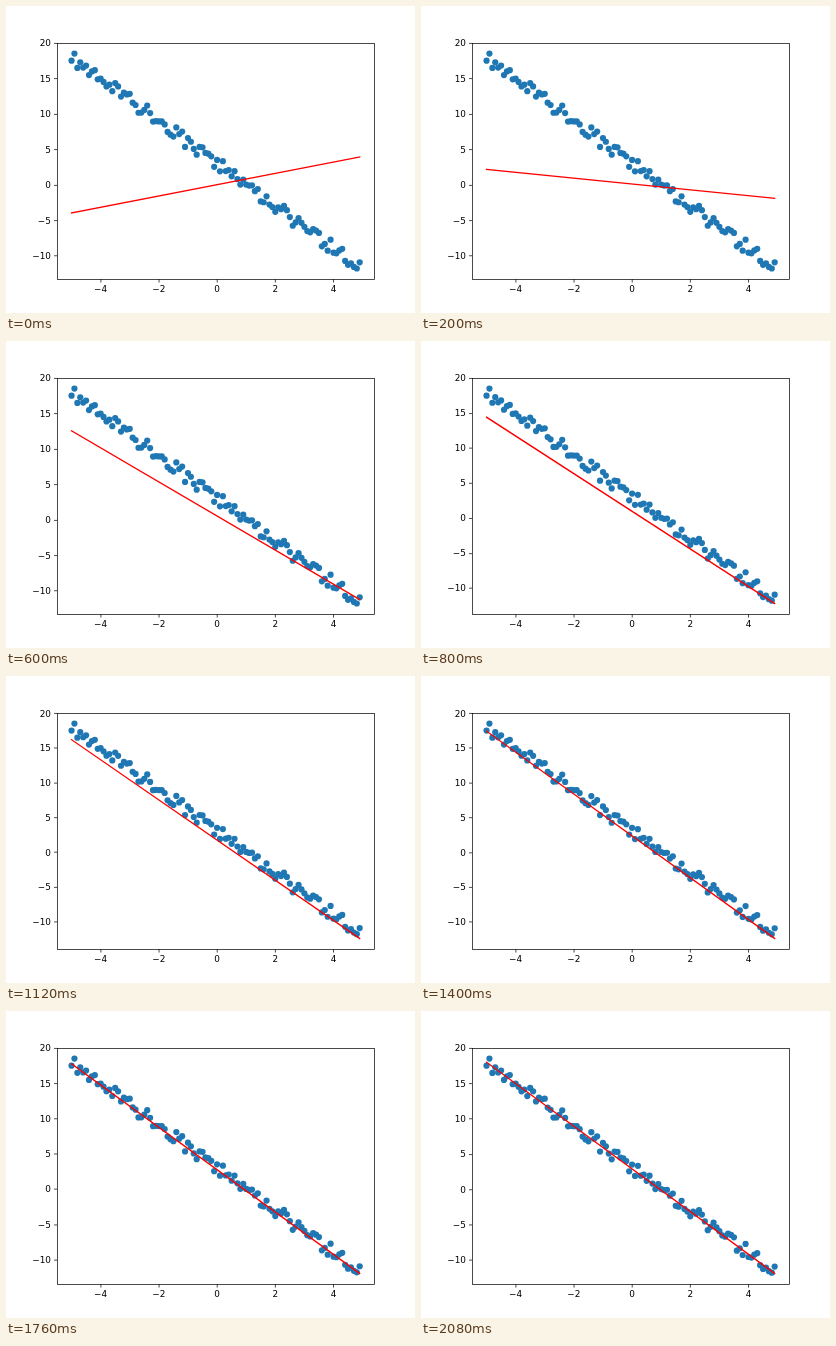
These frames come from a looping animation (409 by 307 pixels, 2.12 s). An HTML page with a canvas:

```html
<!DOCTYPE html>
<html lang="en">
<head>
<meta charset="utf-8">
<title>Line fit</title>
<style>
html, body { margin: 0; width: 100%; height: 100%; overflow: hidden; background: #fff; }
canvas { display: block; }
</style>
</head>
<body>
<canvas id="plot" width="409" height="307"></canvas>
<script>
const ctx = document.getElementById('plot').getContext('2d');
const STEP = 40, COUNT = 53, RATE = 0.1;
// Plot area inside a 640 x 480 figure
const L = 80, R = 576, T = 57.6, B = 427.2;

// Samples of y = 3 - 3x with even noise between -1 and 1
function sample(n) {
  const pts = [];
  let seed = 25;
  for (let i = 0; i < n; i++) {
    const x = -5 + i / 10;
    pts.push({ x, y: 3 - 3 * x + 2 * seed / 101 - 1 });
    seed = seed * 40 % 101;
  }
  return pts;
}
const pts = sample(100);
const ys = pts.map(p => p.y);
const X0 = pts[0].x, X1 = pts[pts.length - 1].x;

// Gradient descent on the mean absolute error
function descend() {
  const fits = [];
  let w = 0.795, b = 0.016;
  for (let k = 0; k < COUNT; k++) {
    fits.push({ w, b });
    let gw = 0, gb = 0;
    for (const { x, y } of pts) {
      const s = Math.sign(y - w * x - b);
      gw += s * x;
      gb += s;
    }
    w += RATE * gw / pts.length;
    b += RATE * gb / pts.length;
  }
  return fits;
}
const fits = descend();

function scale(lo, hi, from, to) {
  const pad = (hi - lo) * 0.05;
  return v => from + (v - lo + pad) / (hi - lo + 2 * pad) * (to - from);
}
const snap = v => Math.round(v) + 0.5;

function segment(x0, y0, x1, y1) {
  ctx.beginPath();
  ctx.moveTo(x0, y0);
  ctx.lineTo(x1, y1);
  ctx.stroke();
}
const label = v => String(v).replace('-', '\u2212');

function draw({ w, b }) {
  const start = w * X0 + b, end = w * X1 + b;
  const px = scale(X0, X1, L, R);
  const py = scale(Math.min(...ys, start, end), Math.max(...ys, start, end), B, T);

  ctx.setTransform(1, 0, 0, 1, 0, 0);
  ctx.fillStyle = '#fff';
  ctx.fillRect(0, 0, 409, 307);
  ctx.scale(409 / 640, 307 / 480);

  ctx.fillStyle = '#1f77b4';
  for (const { x, y } of pts) {
    ctx.beginPath();
    ctx.arc(px(x), py(y), 4.86, 0, 2 * Math.PI);
    ctx.fill();
  }

  ctx.strokeStyle = '#f00';
  ctx.lineWidth = 2.08;
  ctx.lineCap = 'square';
  segment(px(X0), py(start), px(X1), py(end));

  ctx.strokeStyle = ctx.fillStyle = '#000';
  ctx.lineWidth = 1.11;
  ctx.lineCap = 'butt';
  ctx.font = '13.89px "DejaVu Sans", sans-serif';
  ctx.textAlign = 'center';
  for (let v = -4; v <= 4; v += 2) {
    const x = snap(px(v));
    segment(x, B, x, B + 5.2);
    ctx.fillText(label(v), px(v), 447);
  }
  ctx.textAlign = 'right';
  for (let v = -10; v <= 20; v += 5) {
    const y = snap(py(v));
    segment(L - 4.8, y, L, y);
    ctx.fillText(label(v), 70.3, py(v) + 5.28);
  }
  ctx.strokeRect(snap(L), snap(T), R - L, snap(B) - snap(T));
}

const t0 = performance.now();
function tick() {
  const t = Math.max(0, performance.now() - t0);
  draw(fits[Math.floor(t / STEP) % COUNT]);
  requestAnimationFrame(tick);
}
tick();
</script>
</body>
</html>
```
